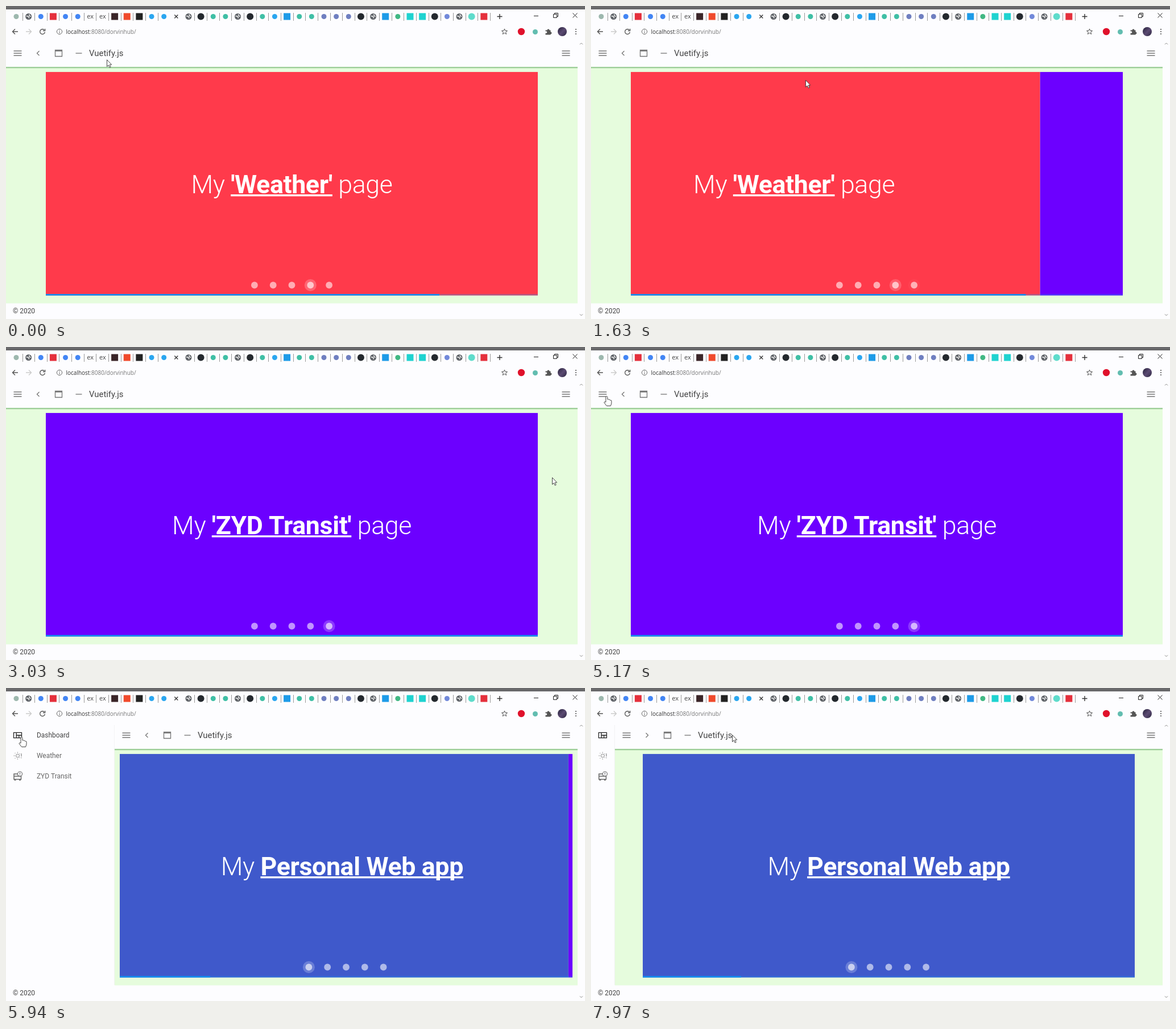
Write an HTML page with a canvas that moves like this. It is 1018x550 px and loops after 8000 ms.

```html
<!DOCTYPE html>
<html lang="en">
<head>
<meta charset="utf-8">
<style>
html, body { margin: 0; height: 100%; overflow: hidden; background: #fdfdff; }
canvas { display: block; }
</style>
</head>
<body>
<canvas id="stage" width="1018" height="550"></canvas>
<script>
const ctx = document.getElementById('stage').getContext('2d');
const LOOP = 8000, PAGE = '#fdfdff', INK = '#757575';
const DRAWER = 191, MINI = 42, RIGHT = 1005;
const TOP = 115.7, HEIGHT = 393.1;
const NEXT_AT = 1614.3, WRAP_AT = 5691, OPEN_AT = 5250, SHRINK_AT = 7150;

const slides = {
  0: { color: '#3f59cb', parts: ['My ', 'Personal Web app', ''] },
  3: { color: '#ff3a4b', parts: ['My ', "'Weather'", ' page'] },
  4: { color: '#6c00ff', parts: ['My ', "'ZYD Transit'", ' page'] }
};

// Cursor stops: time, x, y
const cursorPath = [
  [0, 177, 94], [830, 377, 130], [2370, 377, 130], [2530, 960, 229], [3030, 960, 229],
  [3230, 851, 249], [3500, 851, 249], [3630, 471, 186], [3830, 471, 186], [4630, 31, 89],
  [4670, 31, 89], [4830, 27.5, 86], [6100, 27.5, 86], [6780, 252.5, 84], [7300, 252.5, 84], [7600, 248, 82]
];

// Tab icons: lower case is a circle, upper case a square
const tabs = '.ogRggxxDYKbbXohnnohnbBnnccchoBvTThpotR';
const tabColors = {
  '.': '#9db8ae', g: '#4285f4', R: '#e5303c', D: '#3a2528', Y: '#f04a2c', K: '#222', b: '#2aa6f0',
  h: '#24292e', n: '#3fbfa5', B: '#1e9be8', c: '#6f7fc0', v: '#41b883', T: '#1fd3d0', p: '#7289da', t: '#5fdccb'
};

function bezier(x1, y1, x2, y2) {
  const at = (a, b, s) => 3 * a * s * (1 - s) ** 2 + 3 * b * s * s * (1 - s) + s ** 3;
  return x => {
    if (x <= 0) return 0;
    if (x >= 1) return 1;
    let lo = 0, hi = 1;
    for (let i = 0; i < 24; i++) {
      const mid = (lo + hi) / 2;
      if (at(x1, x2, mid) < x) lo = mid; else hi = mid;
    }
    return at(y1, y2, lo);
  };
}
const slideEase = bezier(.25, .8, .5, 1);
const barEase = bezier(.4, 0, .6, 1);
const drawerEase = bezier(.4, 0, .2, 1);
const mix = (a, b, p) => a + (b - a) * p;

function rect(x, y, w, h, color) {
  ctx.fillStyle = color;
  ctx.fillRect(x, y, w, h);
}
function disc(x, y, r, color) {
  ctx.fillStyle = color;
  ctx.beginPath();
  ctx.arc(x, y, r, 0, 7);
  ctx.fill();
}
function path(d, x, y, stroke, width = 1.2, fill) {
  const p = new Path2D(d);
  ctx.save();
  ctx.translate(x, y);
  if (fill) { ctx.fillStyle = fill; ctx.fill(p); }
  if (stroke) { ctx.strokeStyle = stroke; ctx.lineWidth = width; ctx.stroke(p); }
  ctx.restore();
}
function text(s, x, y, font, color) {
  ctx.font = font;
  ctx.fillStyle = color;
  ctx.fillText(s, x, y);
}
const circlePath = r => `M${-r} 0a${r} ${r} 0 1 0 ${2 * r} 0a${r} ${r} 0 1 0 ${-2 * r} 0`;

function globe(x, y) {
  disc(x, y, 5.5, '#5f6368');
  path('M-4 -1L0 0L1 3M1 -4L2 -1L4 0', x, y, '#eee', 1.5);
}

function drawTabs() {
  rect(0, 0, 1018, 6, '#69696b');
  [...tabs].forEach((kind, i) => {
    const x = 18 + 21.64 * i, y = 18.5;
    if (i !== 12 && i !== 13) rect(Math.round(x + 10.5), 12, 1, 14, '#999');
    if (kind === 'o') globe(x, y);
    else if (kind === 'x') text('ex', x - 5.5, 22, '11px "Open Sans", sans-serif', '#444');
    else if (kind === 'X') path('M-3 -3L3 3M3 -3L-3 3', x, y, '#333', 1.3);
    else if (kind === kind.toLowerCase()) disc(x, y, kind === 'h' || kind === 't' ? 6 : 4.5, tabColors[kind]);
    else rect(x - 6, y - 6, 12, 12, tabColors[kind]);
  });
  path('M-4.5 0H4.5M0 -4.5V4.5', 868, 18.5, '#333', 1.4);
  path('M-4 0H4', 932, 17.5, '#222', 1);
  path('M-3.5 -1.5H2.5V4.5H-3.5ZM-1.5 -1.5V-3.5H4.5V2.5H2.5', 966, 16, '#222', 1);
  path('M-4 -4L4 4M4 -4L-4 4', 1000.5, 16.5, '#222', 1);
}

function drawToolbar() {
  path('M5 0H-4.5M0 -4.5L-4.5 0L0 4.5', 16, 45, '#555', 1.4);
  path('M-5 0H4.5M0 -4.5L4.5 0L0 4.5', 40, 45, '#ccc', 1.4);
  path('M3.2 -3A4.4 4.4 0 1 0 4.4 1M4.6 -5V-1.5H1', 64, 45, '#555', 1.4);
  path(circlePath(4.6) + 'M0 -2.8V-1.4M0 -.4V2.8', 94, 45, '#666', 1);
  const font = '10px "Open Sans", sans-serif';
  text('localhost', 105.5, 48.5, font, '#333');
  text(':8080/dorvinhub/', 105.5 + ctx.measureText('localhost').width, 48.5, font, '#777');
  path('M0 -5L1.4 -1.6L5 -1.4L2.2 .9L3.2 4.5L0 2.4L-3.2 4.5L-2.2 .9L-5 -1.4L-1.4 -1.6Z', 876.5, 45, '#555', 1);
  disc(906, 45, 6.2, '#e0112b');
  disc(930.5, 45.5, 4.5, '#62bdb0');
  path('M-5 -3H-2A2 2 0 1 1 2 -3H4V0A2 2 0 1 1 4 4V5H-5V2A1.8 1.8 0 1 0 -5 -1Z', 953.5, 45.5, null, 0, '#555');
  const avatar = ctx.createLinearGradient(970, 38, 986, 53);
  avatar.addColorStop(0, '#28243c');
  avatar.addColorStop(.5, '#5b4a72');
  avatar.addColorStop(1, '#2c2740');
  disc(978, 45, 8, avatar);
  for (const y of [41, 45, 49]) disc(1002, y, 1.1, '#555');
  path('M-2.5 1.5L0 -1L2.5 1.5', 1011.5, 66, '#888', 1);
  path('M-2.5 -1.5L0 1L2.5 -1.5', 1011.5, 543, '#888', 1);
}

function drawAppBar(left, mini) {
  const menu = 'M-7 -4H7M-7 0H7M-7 4H7';
  path(menu, left + 20.5, 83, INK, 1.3);
  path(mini ? 'M-2 -4L2 0L-2 4' : 'M2 -4L-2 0L2 4', left + 56.5, 83, INK, 1.3);
  path('M-6 -5.5H6V5.5H-6ZM-6 -4H6', left + 92.5, 83, INK, 1.3);
  path('M-5.5 0H5.5', left + 128, 83, INK, 1.3);
  text('Vuetify.js', left + 146, 88, '14.9px Roboto, sans-serif', '#444');
  path(menu, 984.5, 83, INK, 1.3);
}

function drawDrawer(left, mini) {
  if (left <= 0) return;
  ctx.save();
  ctx.beginPath();
  ctx.rect(0, 62, left, 460);
  ctx.clip();
  const x = (mini ? 0 : left - DRAWER) + 20.5;
  path('M-7 -4.7H7V4.7H-7ZM-2.3 -4.7V4.7M-2.3 0H7M2.3 0V4.7', x, 83, '#222', 1.3);
  path(circlePath(3) + 'M0 -6.5V-5M0 5V6.5M-7 0H-5M-5 -5L-4 -4M-5 5L-4 4M4 -4L3 -3M4 4L3 3', x, 119, '#888', 1);
  path('M6.5 -4V1.5M6.5 3V4.3', x, 119, '#888', 1.2);
  path('M-6.5 -4H1V0H6V5.5H-6.5ZM-6.5 0H2', x, 155, '#666', 1.5);
  rect(x - 6, 160, 3, 2.5, '#666');
  rect(x + 2.5, 160, 3, 2.5, '#666');
  path(circlePath(4), x + 4, 151, '#666', 1.1, PAGE);
  path('M0 -2.2V.6M0 1.4V2.4', x + 4, 151, '#666', 1.2);
  if (!mini) ['Dashboard', 'Weather', 'ZYD Transit'].forEach((label, i) =>
    text(label, x + 33.5, 87.3 + 35.8 * i, '11.9px Roboto, sans-serif', i ? '#666' : '#444'));
  rect(left - 1, 65, 1, 457, 'rgba(0,0,0,.04)');
  ctx.restore();
}

function drawSlide(index, x, width) {
  const { color, parts } = slides[index];
  const font = weight => `${weight} 44.7px Roboto, sans-serif`;
  rect(x, TOP, width, HEIGHT, color);
  ctx.letterSpacing = '-0.37px';
  const weights = [300, 700, 300];
  const widths = parts.map((part, i) => {
    ctx.font = font(weights[i]);
    return ctx.measureText(part).width;
  });
  let pen = x + (width - widths[0] - widths[1] - widths[2]) / 2;
  parts.forEach((part, i) => {
    text(part, pen, 329, font(weights[i]), '#fff');
    if (i === 1) rect(pen, 331, widths[1], 3.4, '#fff');
    pen += widths[i];
  });
  ctx.letterSpacing = '0px';
}

function drawCarousel(t, left) {
  const space = RIGHT - left, width = Math.min(space, 883) - 18;
  const x = left + (space - width) / 2;
  const [from, to, start, direction] = t >= WRAP_AT ? [4, 0, WRAP_AT, 1] : [3, 4, NEXT_AT, -1];
  const moved = slideEase((t - start) / 300);

  ctx.save();
  ctx.beginPath();
  ctx.rect(x, TOP, width, HEIGHT);
  ctx.clip();
  if (moved < 1) drawSlide(from, x + direction * moved * width, width);
  if (moved > 0) drawSlide(to, x + direction * (moved - 1) * width, width);

  for (let i = 0; i < 5; i++) {
    const active = i === to ? moved : i === from ? 1 - moved : 0;
    const dotX = x + width / 2 + (i - 2) * 32.8;
    if (active) disc(dotX, 490.5, 10.5, `rgba(255,255,255,${.22 * active})`);
    disc(dotX, 490.5, 5.9, `rgba(255,255,255,${mix(.58, .64, active)})`);
  }
  const part = mix(from + 1, to + 1, barEase((t - start) / 200)) / 5;
  rect(x, 506, width, 3, 'rgba(25,140,240,.3)');
  rect(x, 506, width * part, 3, '#168cee');
  ctx.restore();
}

function drawCursor(t) {
  const i = cursorPath.findLastIndex(stop => stop[0] <= t);
  const a = cursorPath[i], b = cursorPath[i + 1] || a;
  const p = b === a ? 0 : (t - a[0]) / (b[0] - a[0]);
  const eased = p * p * (3 - 2 * p);
  const x = mix(a[1], b[1], eased), y = mix(a[2], b[2], eased);
  const hand = (t > 4560 && t < 6350) || (t > 6720 && t < SHRINK_AT + 100);
  if (hand) path('M-1.5 10V1.5Q0 -.5 1.5 1.5V6Q3.5 5 4 6.7Q6 6 6.4 7.6Q8.5 7 8.5 9V13L7 17.5H0L-4.5 11.5Q-4 9 -1.5 11Z',
    x, y, '#444', 1, '#fff');
  else path('M0 0V12L2.7 9.4L4.7 13.7L6.6 12.8L4.7 8.6H8.2Z', x + .5, y + .5, '#333', .9, '#fff');
}

function draw(t) {
  const mini = t >= SHRINK_AT;
  const left = mini
    ? mix(DRAWER, MINI, drawerEase((t - SHRINK_AT) / 200))
    : DRAWER * drawerEase((t - OPEN_AT) / 200);
  rect(0, 0, 1018, 550, PAGE);
  drawTabs();
  drawToolbar();
  rect(left, 107, RIGHT - left, 415.5, '#e6fcdd');
  const shadow = ctx.createLinearGradient(0, 107, 0, 110.5);
  shadow.addColorStop(0, 'rgba(60,145,60,.6)');
  shadow.addColorStop(1, 'rgba(60,145,60,0)');
  rect(left, 107, RIGHT - left, 3.5, shadow);
  drawCarousel(t, left);
  drawAppBar(left, mini);
  drawDrawer(left, mini);
  text('© 2020', 12, 540.3, '11.9px Roboto, sans-serif', '#444');
  drawCursor(t);
}

function frame() {
  draw(performance.now() % LOOP);
  requestAnimationFrame(frame);
}
frame();
</script>
</body>
</html>
```
